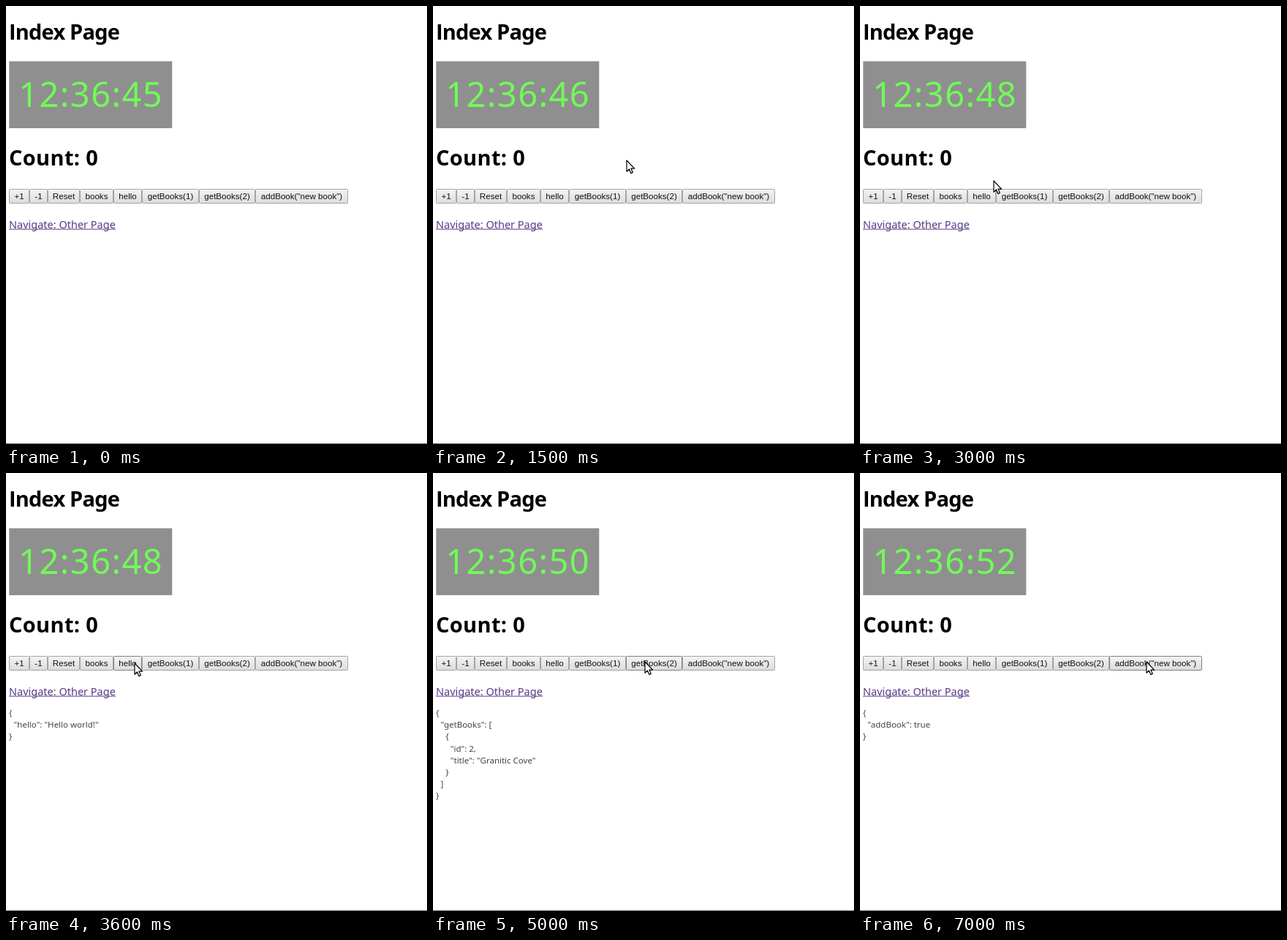
Recreate the animation shown at these times as an HTML page. Size 576 by 600 pixels, loop 7.1 s.

```html
<!DOCTYPE html>
<html lang="en">
<head>
<meta charset="utf-8">
<title>Index Page</title>
<style>
  html, body { margin: 0; width: 100%; height: 100%; overflow: hidden; background: #fff; }
  svg { display: block; width: 576px; height: 600px; }
  text { font-family: "Noto Sans", "Open Sans", sans-serif; white-space: pre; }
  .head { font-size: 29px; font-weight: 600; fill: #000; }
  .plain { font-family: "Open Sans", sans-serif; font-weight: 700; }
  .clock { font-size: 47px; font-weight: 350; letter-spacing: 1.4px; fill: #70fa58; }
  .link { font-size: 14.5px; font-weight: 350; fill: #583a86; }
  .json { font-size: 11.5px; fill: #444; }
  .btn text { font: 11.6px "Liberation Sans", Arial, sans-serif; fill: #111; text-anchor: middle; }
  .btn rect { fill: url(#face); stroke: #a4a4a4; }
  .btn.over rect { stroke: #808080; }
</style>
</head>
<body>
<svg viewBox="0 0 576 600">
  <defs>
    <linearGradient id="face" x2="0" y2="1">
      <stop stop-color="#f4f4f4"/><stop offset="1" stop-color="#dcdcdc"/>
    </linearGradient>
  </defs>
  <rect width="576" height="600" fill="#fff"/>
  <text class="head" x="4" y="46" letter-spacing="-.8"><tspan class="plain">I</tspan>ndex Page</text>
  <rect x="4.3" y="75.5" width="223" height="91.5" fill="#8f8f8f"/>
  <text class="clock" id="clock" x="17.3" y="138"></text>
  <text class="head" x="4" y="218" letter-spacing=".35">Count: 0</text>
  <g id="buttons"></g>
  <text class="link" x="4" y="303.5">Navigate: Other Page</text>
  <rect x="4" y="304.6" width="146" height="1" fill="#583a86"/>
  <g id="output"></g>
  <rect y="598" width="576" height="2" fill="#17171c"/>
  <path id="cursor" d="M0 0V15.2L3.4 12L5.8 17.6L8.3 16.5L5.9 11.1H10.6Z"
        fill="#fff" stroke="#000" stroke-width="1.2" stroke-linejoin="round"/>
</svg>
<script>
const LOOP = 7100, STEP = 100;
const $ = id => document.getElementById(id);

function add(parent, tag, attrs, text) {
  const el = document.createElementNS("http://www.w3.org/2000/svg", tag);
  for (const key in attrs) el.setAttribute(key, attrs[key]);
  if (text) el.textContent = text;
  parent.appendChild(el);
  return el;
}

// label, right edge
const labels = [
  ["+1", 32], ["-1", 57], ["Reset", 101], ["books", 147], ["hello", 186],
  ["getBooks(1)", 264], ["getBooks(2)", 341], ['addBook("new book")', 468]
];
let left = 4;
const buttons = labels.map(([label, right]) => {
  const g = add($("buttons"), "g", { class: "btn" });
  add(g, "rect", { x: left + .5, y: 250.5, width: right - left - 1, height: 19, rx: .8 });
  add(g, "text", { x: (left + right) / 2, y: 264 }, label);
  const button = { g, left, right };
  left = right;
  return button;
});

// time, response
const responses = [
  [3500, { hello: "Hello world!" }],
  [4900, { getBooks: [{ id: 2, title: "Granitic Cove" }] }],
  [6100, { addBook: true }]
].map(([at, data]) => {
  const g = add($("output"), "g", {});
  JSON.stringify(data, null, 2).split("\n").forEach((line, i) => {
    const body = line.trimStart();
    const indent = line.length - body.length;
    add(g, "text", { class: "json", x: 4 + indent * 3.3, y: 332 + i * 16.2 }, body);
  });
  return { at, g };
});

// time, x, y of the pointer tip
const path = [
  [300, 546, 518], [400, 518, 440], [500, 425, 335], [600, 325, 268], [800, 275, 245],
  [1000, 275, 245], [1400, 265, 211], [2500, 265, 211], [2700, 242, 219],
  [3000, 183, 239], [3300, 176, 260], [4200, 176, 260], [4500, 238, 257],
  [4700, 290, 258], [5100, 290, 258], [5500, 372, 258], [5800, 378, 258],
  [6000, 392, 258], [LOOP, 392, 258]
];

function pointAt(t) {
  const i = path.findIndex(p => p[0] > t);
  if (i < 1) return null;
  const [t0, x0, y0] = path[i - 1], [t1, x1, y1] = path[i];
  const k = (t - t0) / (t1 - t0);
  return [x0 + (x1 - x0) * k, y0 + (y1 - y0) * k];
}

function draw(t) {
  const ticks = Math.max(0, 1 + Math.floor((t - 780) / 1015));
  $("clock").textContent = "12:36:" + (45 + ticks);

  const tip = pointAt(t);
  $("cursor").style.display = tip ? "" : "none";
  if (tip) $("cursor").setAttribute("transform", `translate(${tip[0]} ${tip[1]})`);

  for (const b of buttons) {
    const over = tip && tip[1] >= 250 && tip[1] < 270 && tip[0] >= b.left && tip[0] < b.right;
    b.g.classList.toggle("over", !!over);
  }
  responses.forEach(({ at, g }, i) => {
    const next = responses[i + 1];
    g.style.display = t >= at && (!next || t < next.at) ? "" : "none";
  });
}

const start = performance.now();
function frame() {
  const t = (performance.now() - start) % LOOP;
  draw(Math.floor(t / STEP) * STEP);
  requestAnimationFrame(frame);
}
draw(0);
requestAnimationFrame(frame);
</script>
</body>
</html>
```
